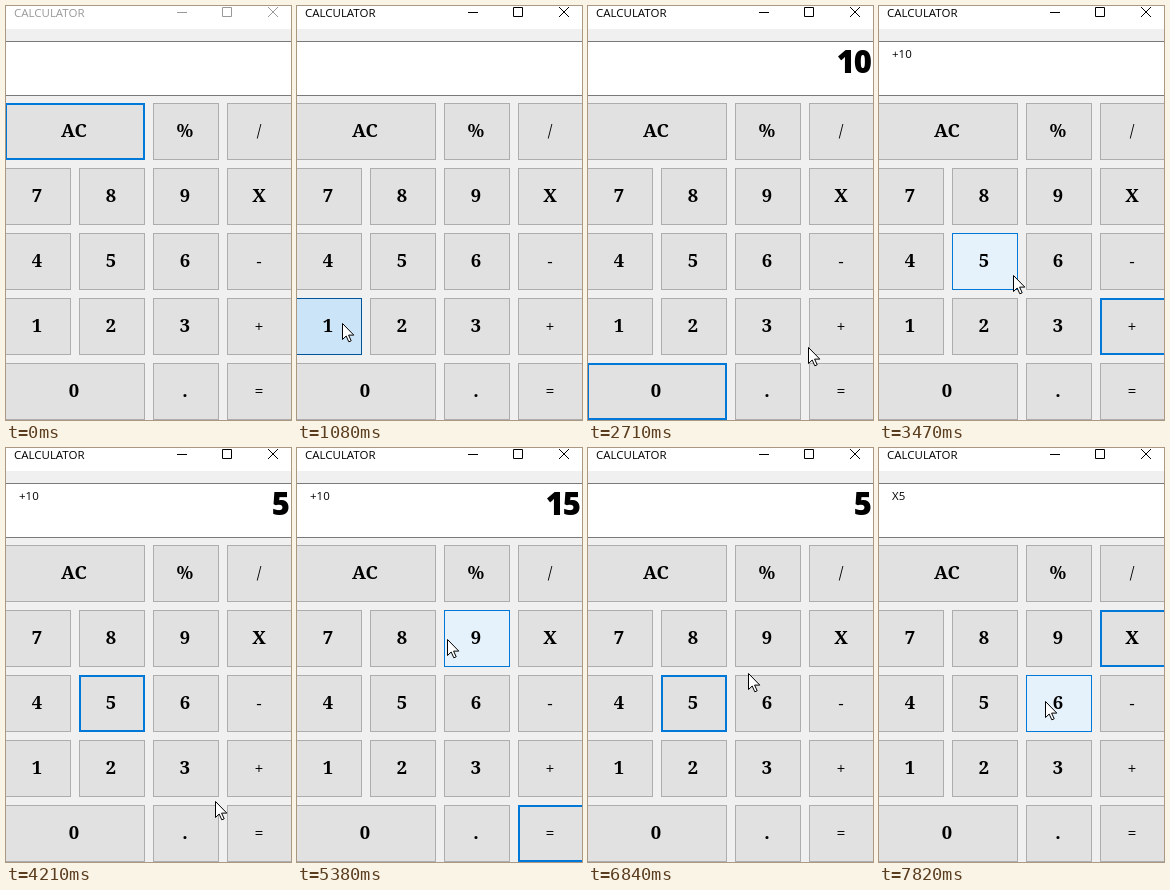
Animation of 285 by 414 pixels, one loop 8000 ms. Source, as an HTML page:

```html
<!DOCTYPE html>
<html lang="en">
<head>
<meta charset="utf-8">
<title>Calculator</title>
<style>
  html, body { margin: 0; width: 100%; height: 100%; overflow: hidden; background: #f0f0f0; }
  svg { display: block; }
  .ui { font: 11.5px "Open Sans", sans-serif; }
  .key { font: 900 18.5px "Noto Serif", serif; text-anchor: middle; }
  .thin { font-weight: 500; font-size: 16px; }
  #display { font: 800 31px "Open Sans", sans-serif; font-stretch: 75%; letter-spacing: -1px; text-anchor: end; }
</style>
</head>
<body>
<svg width="285" height="414" viewBox="0 0 285 414">
  <rect width="285" height="414" fill="#f0f0f0"/>
  <rect width="285" height="23" fill="#fff"/>
  <g id="bar">
    <text class="ui" x="8" y="11">CALCULATOR</text>
    <path d="M171 6.5h10M216.5 1.5h9v9h-9zM262 1l10 10M272 1l-10 10" fill="none" stroke="currentColor"/>
  </g>
  <rect x="-1.5" y="35.5" width="288" height="54" fill="#fff" stroke="#7a7a7a"/>
  <text id="memo" class="ui" x="13" y="52"></text>
  <text id="display" x="283" y="67"></text>
  <g id="keys"></g>
  <path id="cursor" d="M.5.5v16l3.7-3.5 2.6 5.8 2.4-1-2.6-5.7h5.2z" fill="#fff" stroke="#000"/>
</svg>
<script>
const LOOP = 8000, COL = 74, ROW = 65, KEY_H = 57;
const $ = id => document.getElementById(id);

function add(tag, attrs, parent) {
  const el = document.createElementNS('http://www.w3.org/2000/svg', tag);
  for (const name in attrs) el.setAttribute(name, attrs[name]);
  return parent.appendChild(el);
}

// Each row lists its labels; AC and 0 span two columns.
const keys = [];
['AC % /', '7 8 9 X', '4 5 6 -', '1 2 3 +', '0 . ='].forEach((row, r) => {
  let col = 0;
  for (const label of row.split(' ')) {
    const span = label === 'AC' || label === '0' ? 2 : 1;
    const x = col * COL - 1, y = 97 + r * ROW, w = span * COL - 8;
    const box = add('rect', {}, $('keys'));
    const text = add('text', {
      x: x + w / 2 - 1, y: y + 34,
      class: '/-+='.includes(label) ? 'key thin' : 'key'
    }, $('keys'));
    text.textContent = label;
    keys.push({ label, x, y, w, box });
    col += span;
  }
});

// press time, release time, key, display after release, memo after release
const clicks = [
  [1080, 1250, '1', '1', ''],
  [2240, 2350, '0', '10', ''],
  [2990, 3130, '+', '', '+10'],
  [3730, 3800, '5', '5', '+10'],
  [4750, 4890, '=', '15', '+10'],
  [5590, 5730, 'AC', '', ''],
  [6430, 6500, '5', '5', ''],
  [7330, 7400, 'X', '', 'X5']
];

// time, x, y of the pointer tip
const path = [
  [0, 300, 85], [330, 272, 96], [680, 45, 317], [1820, 45, 317],
  [2060, 72, 380], [2400, 72, 380], [2640, 204, 350], [2710, 220, 341],
  [2850, 245, 322], [3200, 245, 322], [3530, 110, 258], [3880, 110, 258],
  [4210, 209, 353], [4410, 248, 384], [5030, 248, 384], [5380, 150, 191],
  [5520, 95, 126], [5870, 95, 126], [6220, 110, 258], [6640, 110, 258],
  [6840, 160, 225], [7060, 250, 190], [7500, 250, 190], [7820, 166, 253],
  [LOOP, 166, 253]
];

function pointer(t) {
  const i = path.findIndex(p => p[0] > t);
  const [t0, x0, y0] = path[i - 1], [t1, x1, y1] = path[i];
  const k = (t - t0) / (t1 - t0);
  return [Math.round(x0 + (x1 - x0) * k), Math.round(y0 + (y1 - y0) * k)];
}

function paintKey({ x, y, w, box }, fill, stroke, line) {
  const attrs = {
    x: x + line / 2, y: y + line / 2, width: w - line, height: KEY_H - line,
    fill, stroke, 'stroke-width': line
  };
  for (const name in attrs) box.setAttribute(name, attrs[name]);
}

function draw(t) {
  const [px, py] = pointer(t);
  const pressed = clicks.filter(c => c[0] <= t).pop();
  const done = clicks.filter(c => c[1] <= t).pop();
  const focus = pressed ? pressed[2] : 'AC';
  const held = pressed && t < pressed[1];

  for (const key of keys) {
    const focused = key.label === focus;
    const over = t >= 330 && px >= key.x && px < key.x + key.w && py >= key.y && py < key.y + KEY_H;
    if (over && focused && held) paintKey(key, '#cce4f7', '#005499', 1);
    else if (over) paintKey(key, '#e5f1fb', '#0078d7', 1);
    else if (focused) paintKey(key, '#e1e1e1', '#0078d7', 2);
    else paintKey(key, '#e1e1e1', '#adadad', 1);
  }

  const ink = pressed ? '#000' : '#999';
  $('bar').setAttribute('fill', ink);
  $('bar').setAttribute('color', ink);
  $('display').textContent = done ? done[3] : '';
  $('memo').textContent = done ? done[4] : '';
  $('cursor').setAttribute('transform', `translate(${px} ${py})`);
  $('cursor').setAttribute('visibility', t < 330 ? 'hidden' : 'visible');
}

const start = performance.now();
function tick() {
  draw((performance.now() - start) % LOOP);
  requestAnimationFrame(tick);
}
tick();
</script>
</body>
</html>
```
